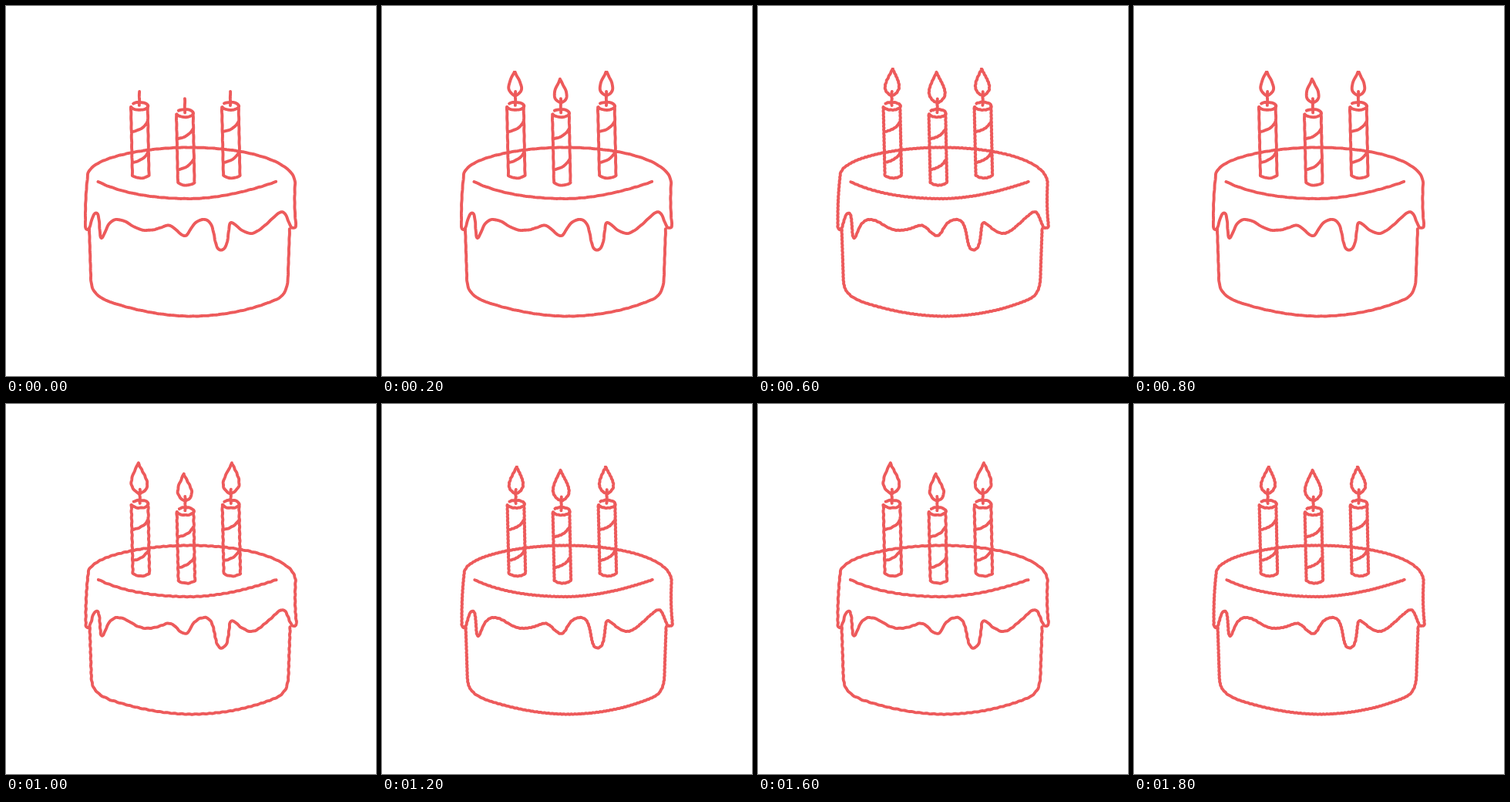
Recreate the animation shown at these times as an HTML page with a canvas. Size 480 by 480 pixels, loop 2 s.

```html
<!DOCTYPE html>
<html lang="en">
<head>
<meta charset="utf-8">
<title>Birthday cake</title>
<style>
  html, body { margin: 0; width: 100%; height: 100%; overflow: hidden; background: #fff; }
  canvas { display: block; }
</style>
</head>
<body>
<canvas id="stage" width="480" height="480"></canvas>
<script>
const ctx = document.getElementById('stage').getContext('2d');
const STEP_MS = 200, STEPS = 10;

// Turning points of the icing edge: x, y, roundness
const drips = [
  [106, 290, 4], [117, 268.5, 6], [124, 301, 4], [144, 277, 14], [182, 291, 16], [211, 284.5, 7],
  [232, 298, 7], [257, 277, 17], [279, 316.5, 12], [292, 281, 5], [318, 295, 12], [358, 267, 7], [372, 288, 5]
];
const icing = drips.map(([x, y, r]) => `S${x - r},${y} ${x},${y}`).join('');

const cake = [
  `M240,183.5 C180,183 106,197 106,220 Q102.5,250 103,284 ${icing}
   S376,286 376,282 Q373.5,260 375,230 C375,202 315,184 240,183.5`,
  'M108,289 L110,350 C110,370 116,376 135,384 Q190,402 240,402.5 Q300,402 350,381 C364,375 366,362 366,345 L368,289',
  'M119.5,228 Q165,250 240,250 Q290,249 350,228'
];
const candle = [
  'M162,131 L164,220 Q175,226.5 185.5,220 L183.7,129',
  'M162.5,131 A11,5 0 1 0 165,126.5',
  'M164,163 Q179,160 183.5,150',
  'M164.5,203 Q180,200 185,188',
  'M173,111 V129'
];
const candleOffsets = [[0, 0], [59, 9.3], [118, 0]];

// Flames: sideways lean of the tip, height
const poses = [
  { shift: 0, amp: 0.15, freq: 0.5, top: 84, flames: [[-1, 32], [-1, 31], [0, 32]] },
  { shift: 0.6, amp: 0.3, freq: 0.7, top: 74, flames: [[-2, 40], [-2, 35], [1.5, 40]] },
  { shift: 0.6, amp: 0.25, freq: 1.3, top: 80, flames: [[1, 35], [-1, 40], [-1.5, 35]] }
];

function flamePath([lean, height]) {
  const x = 173, base = 116.5, width = height / 2;
  const up = part => base - height * part;
  const side = dir => `C${x + lean + dir * width * 0.3},${up(0.65)} ${x + dir * width},${up(0.22)}`;
  const half = dir => `M${x + lean},${up(1)} ${side(dir)} ${x},${base}`;
  return [half(-1), half(1)];
}

// Adds a curve shifted and slightly shaken by the pose
function addStroke(path, d, { shift, amp, freq }, [ox, oy] = [0, 0]) {
  const curve = document.createElementNS('http://www.w3.org/2000/svg', 'path');
  curve.setAttribute('d', d);
  const length = curve.getTotalLength(), count = Math.ceil(length);
  for (let i = 0; i <= count; i++) {
    const p = curve.getPointAtLength(length * i / count);
    const x = p.x + ox + shift, y = p.y + oy;
    const px = x + amp * Math.sin(freq * (y + 0.4 * x));
    const py = y + amp * Math.cos(freq * (x - 0.4 * y));
    i ? path.lineTo(px, py) : path.moveTo(px, py);
  }
}

for (const pose of poses) {
  pose.base = new Path2D();
  pose.fire = new Path2D();
  for (const d of cake) addStroke(pose.base, d, pose);
  candleOffsets.forEach((offset, i) => {
    for (const d of candle) addStroke(pose.base, d, pose, offset);
    for (const d of flamePath(pose.flames[i])) addStroke(pose.fire, d, pose, offset);
  });
}

function draw() {
  const step = Math.floor(performance.now() / STEP_MS) % STEPS;
  // The loop opens with the candles unlit
  const pose = poses[step ? (step + 2) % 3 : 0];
  ctx.clearRect(0, 0, 480, 480);
  ctx.save();
  ctx.beginPath();
  ctx.rect(101, pose.top, 278, 405 - pose.top);
  ctx.clip();
  ctx.strokeStyle = '#ed5a5b';
  ctx.lineWidth = 3.9;
  ctx.lineCap = ctx.lineJoin = 'round';
  ctx.stroke(pose.base);
  if (step) ctx.stroke(pose.fire);
  ctx.restore();
  requestAnimationFrame(draw);
}
draw();
</script>
</body>
</html>
```
